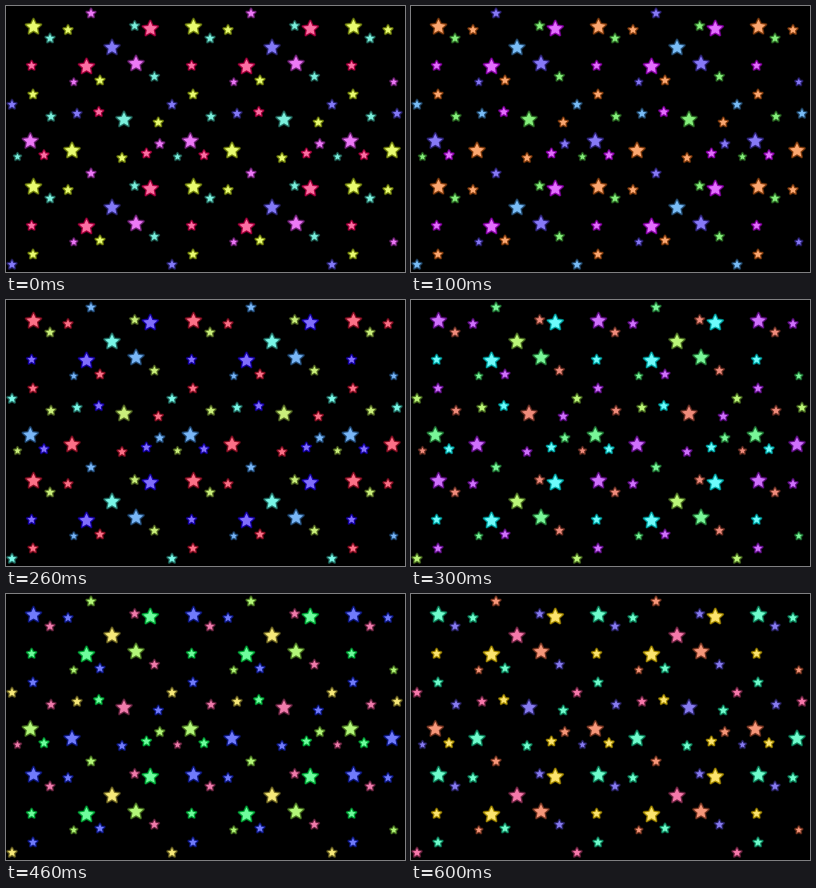
An HTML page with a canvas that plays this animation: 399x266 px, repeating every 700 ms.

```html
<!DOCTYPE html>
<html lang="en">
<head>
<meta charset="utf-8">
<title>Colour-shifting stars</title>
<style>
  html, body { margin: 0; width: 100%; height: 100%; overflow: hidden; background: #000; }
  canvas { display: block; width: 399px; height: 266px; }
</style>
</head>
<body>
<canvas id="sky" width="399" height="266"></canvas>
<script>
const W = 399, H = 266, TILE = 160, STEP = 100, STEPS = 7;
const BIG = 8.7, SMALL = 5.1, TINY = 3.9;
const ctx = document.getElementById('sky').getContext('2d');
ctx.lineJoin = 'round';

// Each group shares a hue sequence; stars are [x, y, radius] inside one tile.
const groups = [
  { hues: [68, 24, 350, 281, 235, 191, 160], fill: '94%, 71%', edge: '80%, 42%',
    stars: [[27.5, 20.3, BIG], [62, 23.5, SMALL], [27, 88, SMALL], [94, 74, SMALL],
            [66, 144, BIG], [152.3, 116, SMALL], [116, 151.5, SMALL]] },
  { hues: [170, 115, 79, 8, 335, 285, 246], fill: '78%, 71%', edge: '48%, 41%',
    stars: [[44, 32, SMALL], [128.7, 19.5, SMALL], [148.4, 70.2, SMALL],
            [45, 110.3, SMALL], [118, 113, BIG], [11.5, 150.5, TINY]] },
  { hues: [245, 208, 172, 88, 53, 13, 336], fill: '88%, 72%', edge: '52%, 43%',
    stars: [[106, 41, BIG], [71, 107.3, SMALL], [6, 98.3, SMALL]] },
  { hues: [338, 289, 248, 180, 140, 92, 50], fill: '96%, 71%', edge: '100%, 47%',
    stars: [[144.3, 22.1, BIG], [25.6, 59.3, SMALL], [80.5, 60, BIG],
            [92.8, 105.6, SMALL], [38, 148.7, SMALL], [140.4, 147, SMALL]] },
  { hues: [295, 247, 211, 135, 92, 51, 14], fill: '88%, 72%', edge: '55%, 44%',
    stars: [[85, 7, SMALL], [130, 57, BIG], [67.8, 75.8, TINY],
            [24.3, 134.5, BIG], [153.8, 137.6, SMALL]] }
];

function tracePath(x, y, r) {
  ctx.beginPath();
  for (let i = 0; i < 10; i++) {
    const a = i * Math.PI / 5 - Math.PI / 2;
    const d = i % 2 ? r * 0.48 : r;
    ctx.lineTo(x + d * Math.cos(a), y + d * Math.sin(a));
  }
  ctx.closePath();
}

// A bright star with a soft, darker rim.
function star(x, y, r, inner, outer) {
  tracePath(x, y, r * 0.9);
  ctx.strokeStyle = outer;
  for (const [width, alpha] of [[3, 0.3], [1.8, 0.6]]) {
    ctx.lineWidth = width;
    ctx.globalAlpha = alpha;
    ctx.stroke();
  }
  ctx.globalAlpha = 1;
  tracePath(x, y, r * 0.86);
  ctx.fillStyle = inner;
  ctx.fill();
}

function draw(step) {
  ctx.fillStyle = '#000';
  ctx.fillRect(0, 0, W, H);
  for (const { hues, fill, edge, stars } of groups) {
    const inner = `hsl(${hues[step]}, ${fill})`;
    const outer = `hsl(${hues[step]}, ${edge})`;
    for (const [sx, sy, r] of stars) {
      // Only stars that fit entirely on the stage are shown.
      for (let y = sy; y + r < H; y += TILE) {
        for (let x = sx; x + r < W; x += TILE) {
          star(x, y + r * 0.08, r, inner, outer);
        }
      }
    }
  }
}

let shown = -1;
function tick() {
  const step = Math.floor(performance.now() / STEP) % STEPS;
  if (step !== shown) draw(shown = step);
  requestAnimationFrame(tick);
}
tick();
</script>
</body>
</html>
```
